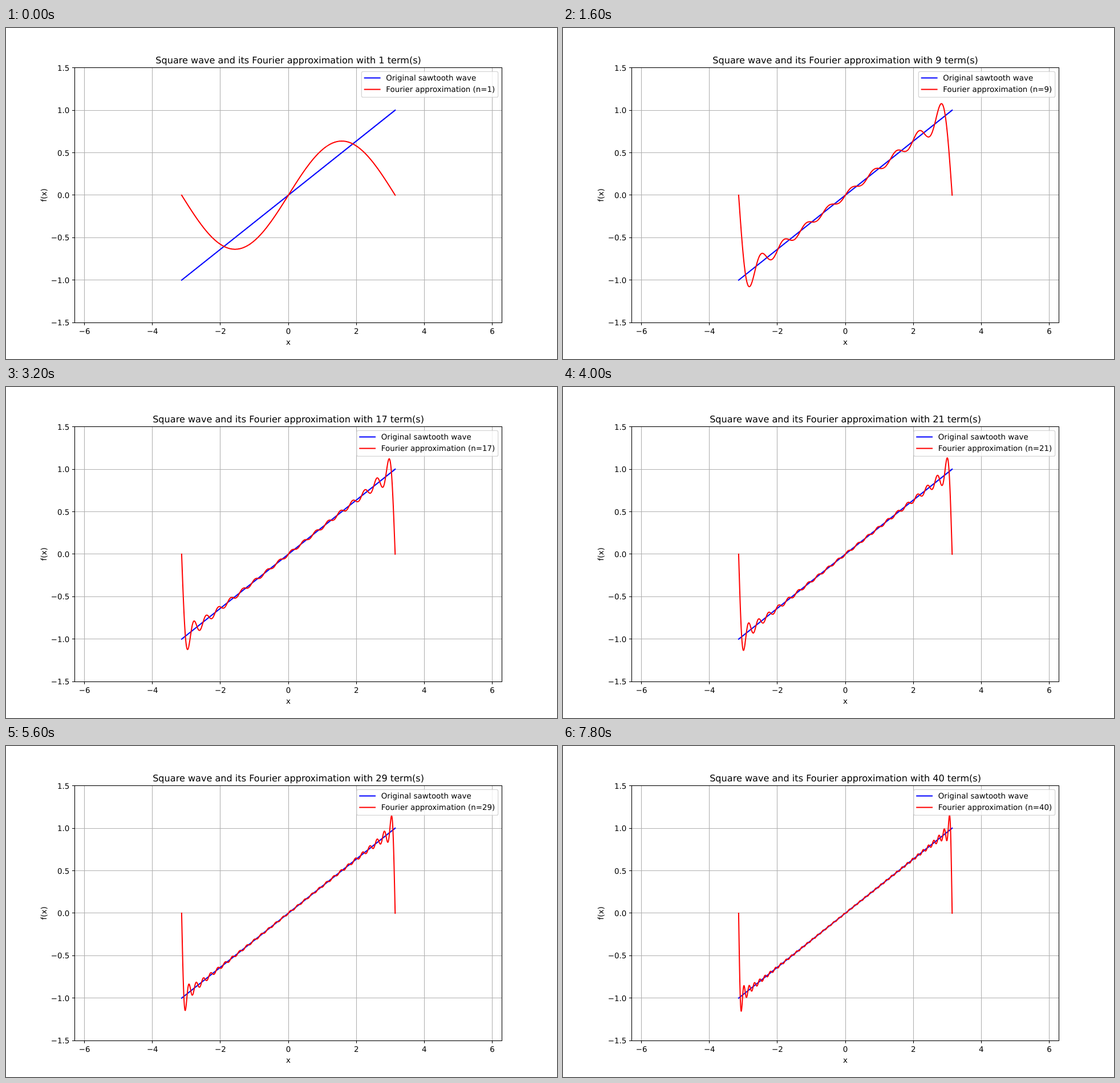
An HTML page with a canvas that plays this animation: 966x580 px, repeating every 8000 ms.

```html
<!DOCTYPE html>
<html lang="en">
<head>
<meta charset="utf-8">
<title>Fourier approximation</title>
<style>
  html, body { margin: 0; width: 100%; height: 100%; overflow: hidden; background: #fff; }
  canvas { display: block; }
</style>
</head>
<body>
<canvas id="stage" width="966" height="580"></canvas>
<script>
const ctx = document.getElementById('stage').getContext('2d');
const STEP_MS = 200, MAX_TERMS = 40, SAMPLES = 1000;
const PT = 966 / 720;                 // one typographic point in pixels
const EM = 10 * PT;                   // body text size
const AXES = { left: 120.75, right: 869.4, top: 69.6, bottom: 516.2 };
const FAMILY = '"DejaVu Sans", sans-serif';

const mapX = x => (AXES.left + AXES.right) / 2 + x * (AXES.right - AXES.left) / (4 * Math.PI);
const mapY = y => (AXES.top + AXES.bottom) / 2 - y * (AXES.bottom - AXES.top) / 3;
const crisp = v => Math.floor(v) + 0.5;
const label = v => String(v).replace('-', '\u2212');

function strokePath(points, color, width, cap = 'butt') {
  ctx.beginPath();
  points.forEach(([x, y]) => ctx.lineTo(x, y));
  ctx.strokeStyle = color;
  ctx.lineWidth = width;
  ctx.lineCap = cap;
  ctx.lineJoin = 'round';
  ctx.stroke();
}

function drawText(text, x, y, align = 'center', size = EM) {
  ctx.font = `${size}px ${FAMILY}`;
  ctx.textAlign = align;
  ctx.fillStyle = '#000';
  ctx.fillText(text, x, y);
}

const drawCurve = (points, color) => strokePath(points, color, 1.5 * PT, 'square');

function sawtoothSum(x, terms) {
  let sum = 0;
  for (let k = 1; k <= terms; k++) sum -= (-1) ** k * Math.sin(k * x) / k;
  return 2 / Math.PI * sum;
}

function drawAxes() {
  const { left, right, top, bottom } = AXES;
  const thin = 0.8 * PT, tick = 3.5 * PT;
  const xTicks = [-6, -4, -2, 0, 2, 4, 6].map(v => [v, crisp(mapX(v))]);
  const yTicks = [-1.5, -1, -0.5, 0, 0.5, 1, 1.5].map(v => [v, crisp(mapY(v))]);

  for (const [, x] of xTicks) strokePath([[x, top], [x, bottom]], '#b0b0b0', thin);
  for (const [, y] of yTicks) strokePath([[left, y], [right, y]], '#b0b0b0', thin);
  for (const [v, x] of xTicks) {
    strokePath([[x, bottom], [x, bottom + tick]], '#000', thin);
    drawText(label(v), mapX(v), 535.8);
  }
  for (const [v, y] of yTicks) {
    strokePath([[left - tick, y], [left, y]], '#000', thin);
    drawText(label(v.toFixed(1)), left - 2 * tick, mapY(v) + 5.1, 'right');
  }
}

function drawFrame() {
  const [l, r, t, b] = [AXES.left, AXES.right, AXES.top, AXES.bottom].map(crisp);
  ctx.lineCap = 'square';
  ctx.lineJoin = 'miter';
  ctx.lineWidth = 0.8 * PT;
  ctx.strokeStyle = '#000';
  ctx.strokeRect(l, t, r - l, b - t);
}

function drawLegend(terms) {
  const entries = [
    ['Original sawtooth wave', '#00f', 87.5],
    [`Fourier approximation (n=${terms})`, '#f00', 107.6]
  ];
  ctx.font = `${EM}px ${FAMILY}`;
  const right = AXES.right - 0.5 * EM, top = AXES.top + 0.5 * EM;
  const textX = right - 0.4 * EM - ctx.measureText(entries[1][0]).width;
  const lineX = textX - 2.8 * EM, left = lineX - 0.4 * EM;

  ctx.beginPath();
  ctx.roundRect(left, top, right - left, 45, 0.2 * EM);
  ctx.globalAlpha = 0.8;
  ctx.fillStyle = '#fff';
  ctx.fill();
  ctx.strokeStyle = '#ccc';
  ctx.lineWidth = PT;
  ctx.stroke();
  ctx.globalAlpha = 1;

  for (const [text, color, y] of entries) {
    drawCurve([[lineX, y], [lineX + 2 * EM, y]], color);
    drawText(text, textX, y + 0.35 * EM, 'left');
  }
}

function drawScene(terms) {
  ctx.fillStyle = '#fff';
  ctx.fillRect(0, 0, 966, 580);
  ctx.textRendering = 'geometricPrecision';
  drawAxes();

  drawCurve([-1, 1].map(v => [mapX(v * Math.PI), mapY(v)]), '#00f');
  drawCurve(Array.from({ length: SAMPLES }, (_, i) => {
    const x = Math.PI * (2 * i / (SAMPLES - 1) - 1);
    return [mapX(x), mapY(sawtoothSum(x, terms))];
  }), '#f00');
  drawFrame();

  drawText(`Square wave and its Fourier approximation with ${terms} term(s)`,
    mapX(0), 61.5, 'center', 12 * PT);
  drawText('x', mapX(0), 554.9);
  ctx.save();
  ctx.translate(70.5, mapY(0));
  ctx.rotate(-Math.PI / 2);
  drawText('f(x)', 0, 0);
  ctx.restore();
  drawLegend(terms);
}

const start = performance.now();
function tick() {
  const elapsed = performance.now() - start;
  drawScene(1 + Math.floor(elapsed / STEP_MS) % MAX_TERMS);
  requestAnimationFrame(tick);
}
tick();
</script>
</body>
</html>
```
